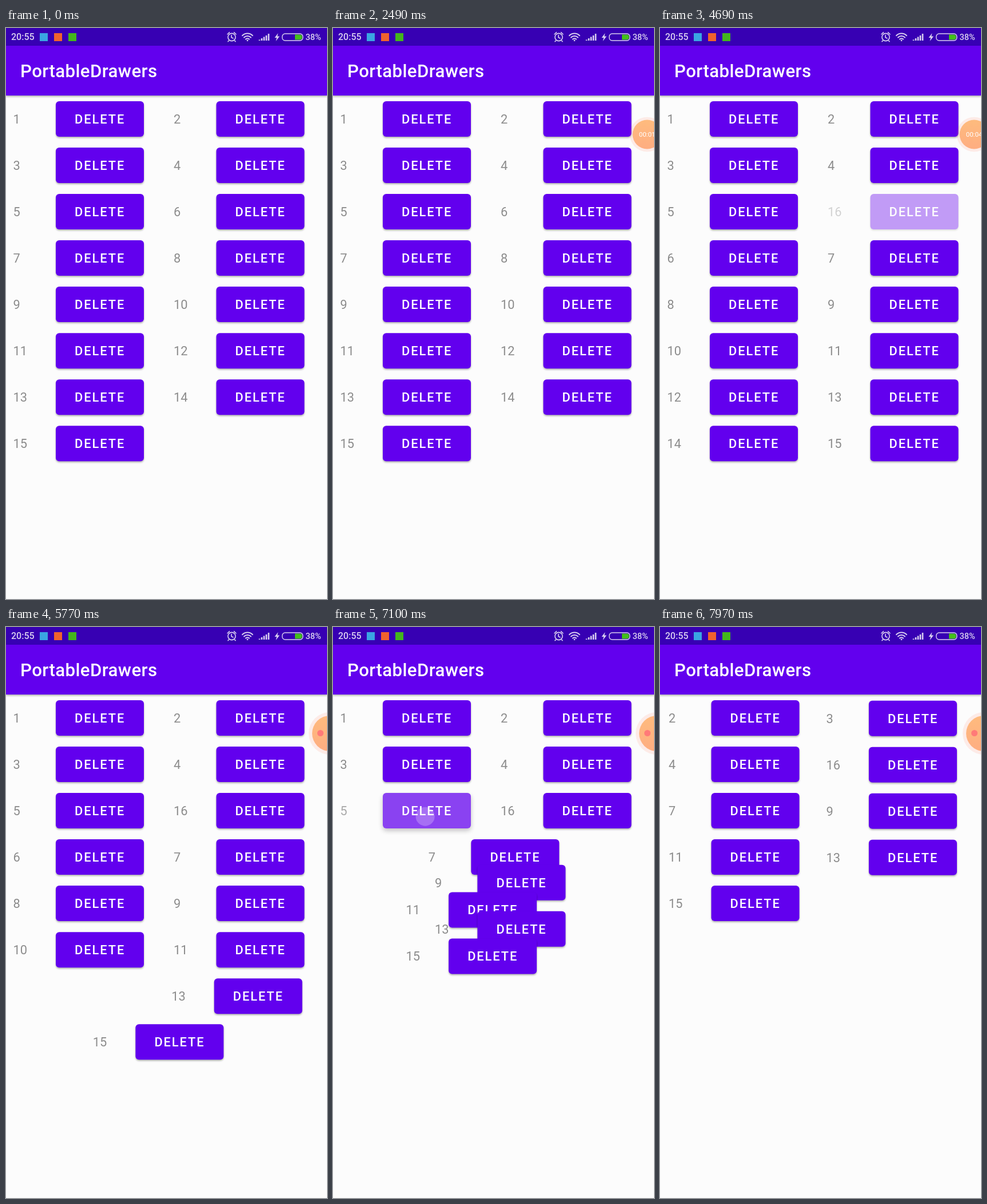
Recreate the animation shown at these times as an HTML page. Size 561 by 998 pixels, loop 8 s.

```html
<!DOCTYPE html>
<html lang="en">
<head>
<meta charset="utf-8">
<title>Tile list</title>
<style>
html, body { margin: 0; width: 100%; height: 100%; overflow: hidden; background: #fcfcfc; }
#stage { position: relative; width: 561px; height: 998px; overflow: hidden; font-family: Roboto, sans-serif; }
#status, #status svg { position: absolute; left: 0; top: 0; width: 561px; height: 31px; }
#status { background: #3700b3; z-index: 2; }
#bar {
  position: absolute; left: 0; top: 31px; width: 561px; height: 87.3px; background: #6200ee; z-index: 1;
  box-shadow: 0 2px 3px rgba(0, 0, 0, .3);
}
#bar h1 {
  margin: 0; padding-left: 25px; color: #fff;
  font: 500 31.2px/90px Roboto, sans-serif; letter-spacing: .39px;
}
.item { position: absolute; left: 0; top: 0; width: 280px; height: 62px; }
.item span { position: absolute; left: 12.5px; color: #8c8c8c; font-size: 21.8px; line-height: 64px; }
.item b {
  position: absolute; left: 87px; width: 154.3px; height: 62.2px; border-radius: 6px; overflow: hidden;
  background: #6200ee; color: #fff; text-align: center; box-shadow: 0 2px 3px rgba(0, 0, 0, .3);
  font: 500 21.8px/64px Roboto, sans-serif; letter-spacing: 1.95px;
}
.item.pressed b { box-shadow: 0 4px 8px rgba(0, 0, 0, .32); }
.item i {
  position: absolute; left: 74px; top: 41px; width: 0; height: 0; border-radius: 50%;
  transform: translate(-50%, -50%); background: rgba(255, 255, 255, .24);
}
#bubble {
  position: absolute; left: -37px; top: 148.5px; width: 74px; height: 74px; border-radius: 50%;
  background: rgba(255, 120, 90, .13); z-index: 3;
}
#disc {
  position: absolute; left: 6px; top: 6px; width: 62px; height: 62px; border-radius: 50%;
  background: linear-gradient(rgba(255, 155, 55, .6), rgba(255, 132, 62, .6));
}
#timer { position: absolute; width: 74px; text-align: center; color: #fff; font-size: 14px; line-height: 75px; }
#dot { position: absolute; left: 15px; top: 31.5px; width: 11px; height: 11px; border-radius: 50%; background: #ff7a78; }
</style>
</head>
<body>
<div id="stage">
  <div id="status">
    <svg viewBox="0 0 561 31" fill="none" stroke="#d9cff0" stroke-width="1.6" stroke-linecap="round">
      <g stroke="none">
        <rect x="59" y="9" width="14" height="14" fill="#3aa5e2"/>
        <rect x="84" y="9" width="14" height="14" fill="#f0622d"/>
        <rect x="109" y="9" width="14" height="14" fill="#43b61c"/>
        <g fill="#d9cff0" font-family="Roboto, sans-serif" font-weight="500">
          <text x="9" y="21" font-size="16">20:55</text>
          <text x="523.5" y="21" font-size="14.6">38%</text>
        </g>
      </g>
      <circle cx="394.5" cy="16" r="6.6"/>
      <path d="M394 12.5v4l3 1.5M387 11l3.5-3.4M402 11l-3.5-3.4M389.5 22l-1.5 1.6M399.5 22l1.5 1.6"/>
      <path d="M413 13.2a13 13 0 0 1 18 0M416 16.5a8.6 8.6 0 0 1 12 0M419 19.6a4.5 4.5 0 0 1 6 0" stroke-width="2"/>
      <circle cx="422" cy="21.8" r="1.4" fill="#d9cff0" stroke="none"/>
      <path id="traffic" d="M428.5 23.5v-4M431 19.5v4" stroke-width="1.2"/>
      <path d="M443 22v-1.5M447 22v-4M451 22v-6.5M455 22v-9M459 22v-12" stroke-width="2.6" stroke-linecap="butt"/>
      <path d="M475.5 9l-6 8h3.6l-1.5 6 6.5-8.4h-3.8z" fill="#d9cff0" stroke="none"/>
      <rect x="482.8" y="10" width="36" height="12" rx="5" stroke-width="1.4"/>
      <path d="M505 11.5h8.5a4 4 0 0 1 4 4v1a4 4 0 0 1-4 4H505z" fill="#43c01a" stroke="none"/>
    </svg>
  </div>
  <div id="bar"><h1>PortableDrawers</h1></div>
  <div id="list"></div>
  <div id="bubble"><div id="disc"></div><div id="timer"></div><div id="dot"></div></div>
</div>
<script>
const LOOP = 8000, COL = 280.5, ROW = 81.05, TOP = 127.9;
const FADE = 150, MOVE = 312, PRESS = 60;
const $ = id => document.getElementById(id);
const clamp = v => Math.max(0, Math.min(1, v));
const ease = (t, start, length) => (1 - Math.cos(Math.PI * clamp((t - start) / length))) / 2;
const mix = (a, b, p) => a + (b - a) * p;
const slot = i => [i % 2 * COL, TOP + Math.floor(i / 2) * ROW];

// Deletions: [time of the tap, number]
const taps = [[5290, 14], [5598, 12], [5910, 10], [6396, 8], [6753, 6], [7049, 5], [7528, 1]];
const insert = { at: 4240, index: 5, move: 375, fade: 180 };

function makeItem(n) {
  const el = document.createElement('div');
  el.className = 'item';
  el.innerHTML = `<span>${n}</span><b>DELETE<i></i></b>`;
  return { n, el, ripple: el.querySelector('i'), moves: [], born: -1e4, fadeIn: 1, tap: Infinity };
}

function place(item, t) {
  const m = item.moves.findLast(m => m.at <= t) || item.moves[0];
  const p = ease(t, m.start, m.length);
  return m.from.map((v, i) => mix(v, m.to[i], p));
}

// A new move takes over from wherever the item is, and holds there until it starts.
function shift(order, first, at, start, length) {
  order.slice(first).forEach((item, i) =>
    item.moves.push({ at, start, length, from: place(item, at), to: slot(first + i) }));
}

function rest(item, i) {
  item.moves.push({ at: -1e4, start: -1e4, length: 1, from: slot(i), to: slot(i) });
}

const order = Array.from({ length: 15 }, (_, i) => makeItem(i + 1));
order.forEach(rest);

const added = makeItem(16);
rest(added, insert.index);
added.born = insert.at + insert.move;
added.fadeIn = insert.fade;
order.splice(insert.index, 0, added);
shift(order, insert.index + 1, insert.at, insert.at, insert.move);

const items = order.slice();
items.forEach(item => $('list').append(item.el));

for (const [at, n] of taps) {
  const i = order.findIndex(item => item.n === n);
  order.splice(i, 1)[0].tap = at;
  shift(order, i, at, at + FADE, MOVE);
}

function drawItem(item, t) {
  const [x, y] = place(item, t);
  const since = t - item.tap;
  const alpha = ease(t, item.born, item.fadeIn) * (1 - ease(t, item.tap, FADE));
  const size = Math.max(0, since) * .63;
  item.el.style.transform = `translate(${x}px, ${y}px)`;
  item.el.style.opacity = alpha;
  item.el.style.visibility = alpha > 0 ? 'visible' : 'hidden';
  item.el.classList.toggle('pressed', since >= -PRESS);
  item.ripple.style.width = item.ripple.style.height = size + 'px';
}

const ticks = [2450, 3780, 4240, 4640];
const show = (id, on) => $(id).style.visibility = on ? 'visible' : 'hidden';

// The bubble shrinks as it reaches the edge, then docks half hidden at full size.
function drawBubble(t) {
  const slide = ease(t, 1790, 700), dock = ease(t, 5300, 200);
  const x = 523.5 + 25.5 * slide + 17 * dock;
  const scale = 1 - .18 * (slide - dock);
  const docked = t >= 5300, on = t >= 1785;
  $('bubble').style.transform = `translateX(${x}px) scale(${scale})`;
  $('timer').textContent = '00:0' + ticks.filter(at => t >= at).length;
  show('bubble', on);
  show('timer', on && !docked);
  show('dot', on && docked);
}

function draw(now) {
  const t = now % LOOP;
  items.forEach(item => drawItem(item, t));
  drawBubble(t);
  show('traffic', t >= 1785 && t < 2490 || t >= 6200 && t < 6700);
  requestAnimationFrame(draw);
}
draw(performance.now());
</script>
</body>
</html>
```
